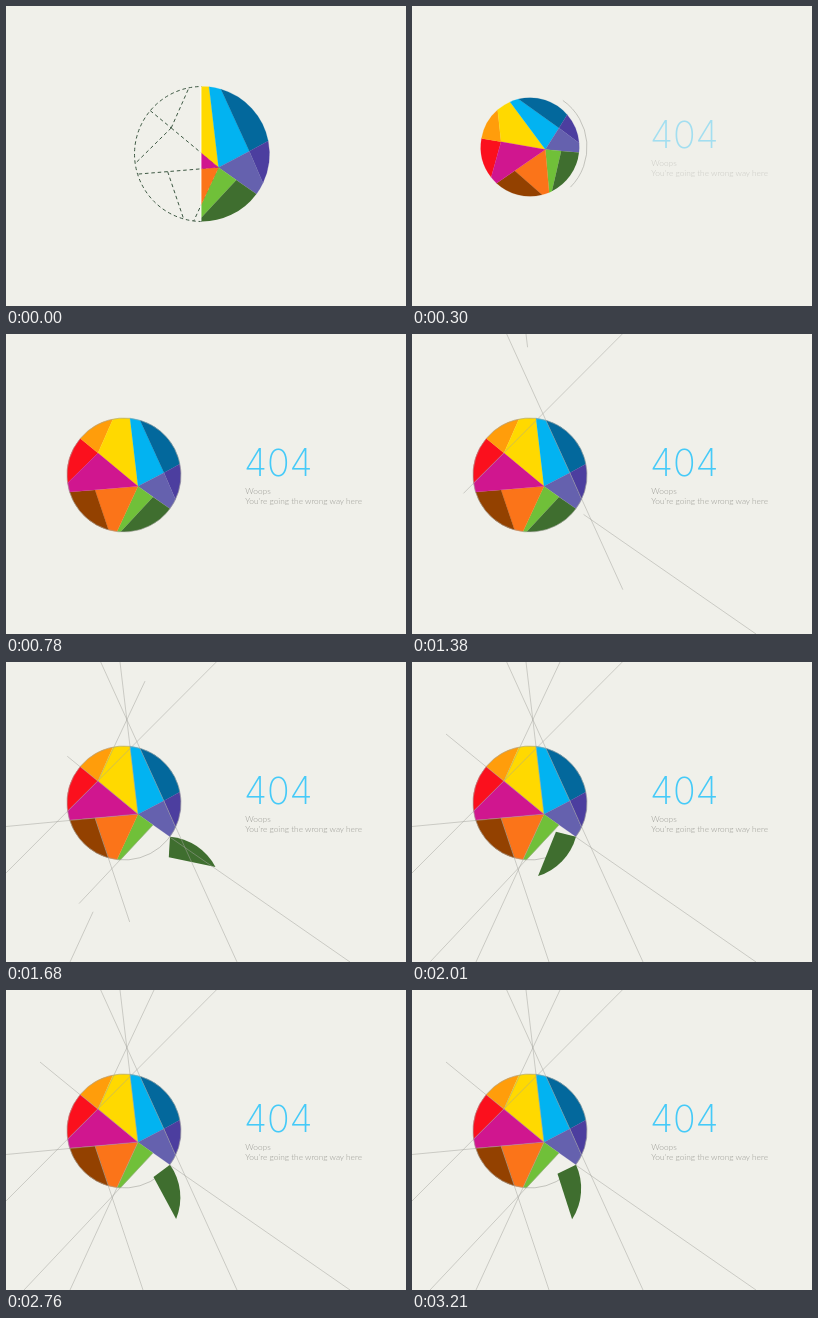
An HTML page that plays this animation: 400 by 300 pixels, repeating every 3.24 s.

```html
<!DOCTYPE html>
<html lang="en">
<head>
<meta charset="utf-8">
<title>404</title>
<style>
  html, body { margin: 0; width: 100%; height: 100%; overflow: hidden; background: #f0f0ea; }
  svg { display: block; width: 100%; height: 100%; }
  .code { font: 200 37.5px Inter, sans-serif; fill: #45caf8; }
  .note { font: 300 8.3px Lato, sans-serif; fill: #999993; }
</style>
</head>
<body>
<svg viewBox="0 0 400 300">
  <defs><clipPath id="wipe"><rect id="wipeRect" y="-60" width="140" height="120"/></clipPath></defs>
  <g id="ball">
    <g id="sketch">
      <path id="seams" fill="none" stroke="#33503a" stroke-width=".8" stroke-dasharray="3 2.4"/>
      <path id="wipeEdge" stroke="#fff" stroke-width="1.6"/>
    </g>
    <g clip-path="url(#wipe)"><g id="wedges"></g></g>
  </g>
  <path id="ring" fill="none" stroke="#a3a39c" stroke-width=".6"/>
  <g id="leafHolder" transform="translate(118 141)"></g>
  <g id="guides" stroke="#a3a39c" stroke-width=".5"></g>
  <g id="copy">
    <text class="code" x="238" y="141.8">404</text>
    <text class="note" x="239.3" y="160">Woops</text>
    <text class="note" x="239.3" y="170">You’re going the wrong way here</text>
  </g>
</svg>
<script>
const LOOP = 3240, R = 57;
const byId = id => document.getElementById(id);
const clamp = v => Math.max(0, Math.min(1, v));
const progress = (t, start, length) => clamp((t - start) / length);
const mix = (a, b, p) => a + (b - a) * p;
const easeOut = p => 1 - (1 - p) ** 3;
const easeSine = p => (1 - Math.cos(Math.PI * p)) / 2;

function add(parent, tag, attrs) {
  const el = document.createElementNS('http://www.w3.org/2000/svg', tag);
  for (const key in attrs) el.setAttribute(key, attrs[key]);
  return parent.appendChild(el);
}

// Eased value through [time, value] pairs.
function track(keys, t) {
  if (t <= keys[0][0]) return keys[0][1];
  for (let i = 1; i < keys.length; i++) {
    const [t0, v0] = keys[i - 1], [t1, v1] = keys[i];
    if (t < t1) return mix(v0, v1, easeSine((t - t0) / (t1 - t0)));
  }
  return keys[keys.length - 1][1];
}

// Ball geometry: inner joints, then rim points clockwise from the upper left.
const P = {
  A: [-26, -22], H: [14, 11.3], K: [40, -2.3], M: [29, 22], N: [-29, 14.9],
  a: [-43.7, -36.6], b: [-11, -56], c: [6, -56.7], d: [16, -54.7], e: [55.9, -11],
  f: [51.5, 24.4], g: [46, 33.7], m: [-3.5, 56.9], h: [-7, 56.6], i: [-15.5, 54.9],
  j: [-54.4, 17], k: [-56.4, 8]
};
const isRim = name => name === name.toLowerCase();
const outline = names => [...names].map((name, i) => {
  const arc = i && isRim(name) && isRim(names[i - 1]);
  return (i ? (arc ? `A${R} ${R} 0 0 1 ` : 'L') : 'M') + P[name];
}).join('') + 'Z';

const wedges = [
  ['Aka', '#fb101d'], ['Aab', '#ff9d0b'], ['HAbc', '#ffd900'], ['HcdK', '#02b3f1'],
  ['Kde', '#03689c'], ['Kef', '#4c3e9f'], ['HKfg', '#6561ae'], ['HMmh', '#70c039'],
  ['HhiN', '#fb7419'], ['Nij', '#934100'], ['AHjk', '#d0168f']
];
for (const [names, fill] of wedges) {
  add(byId('wedges'), 'path', { d: outline(names), fill, stroke: fill, 'stroke-width': .2 });
}
const leafAttrs = { d: outline('Mgm'), fill: '#3f6e2f' };
const attachedLeaf = add(byId('wedges'), 'path', leafAttrs);
const hangingLeaf = add(byId('leafHolder'), 'path', leafAttrs);

const seams = ['aA', 'Ak', 'Ab', 'AH', 'Hj', 'Ni', 'Hh'];
byId('seams').setAttribute('d',
  `M0 ${R}A${R} ${R} 0 0 1 0 ${-R}` + seams.map(([s, e]) => `M${P[s]}L${P[e]}`).join(''));

// Construction lines: x1, y1, x2, y2, start, duration.
const guides = [
  [344, 300, 163, 174.5, 1030, 550],
  [94.7, 0, 231, 300, 1070, 660],
  [210.3, 0, 0, 211, 1175, 550],
  [114, 0, 132, 152, 1372, 300],
  [0, 164.5, 132, 152, 1395, 360],
  [92, 119, 148, 0, 1430, 550],
  [89, 156, 137, 300, 1490, 550],
  [132, 152, 34, 72, 1490, 550],
  [147, 163, 18, 300, 1545, 550],
  [64, 300, 132, 152, 1610, 550]
].map(([x1, y1, x2, y2, start, length]) => ({
  x1, y1, x2, y2, start, length, el: add(byId('guides'), 'line', { x1, y1 })
}));

const scaleKeys = [[30, 1.184], [270, .86], [540, 1]];
const turnKeys = [[30, 0], [290, -30], [570, 0]];
const swingKeys = [
  [1410, 0], [1710, -124], [1990, -20], [2280, -92], [2520, -48], [2790, -72], [3060, -58], [3240, -61]
];

function drawRing(t) {
  const half = mix(0, 180, easeSine(progress(t, 160, 400)));
  const point = deg => {
    const a = deg * Math.PI / 180;
    return [118 + R * Math.cos(a), 141 + R * Math.sin(a)];
  };
  const arc = deg => `A${R} ${R} 0 0 ${deg > 0 ? 1 : 0} ${point(-5 + deg)}`;
  byId('ring').setAttribute('d', half ? `M${point(-5)}${arc(half)}M${point(-5)}${arc(-half)}` : '');
}

function render(t) {
  const move = easeSine(progress(t, 30, 250));
  const x = mix(196, 118, move), y = mix(148, 141, move);
  byId('ball').setAttribute('transform',
    `translate(${x} ${y}) rotate(${track(turnKeys, t)}) scale(${track(scaleKeys, t)})`);

  const wipe = progress(t, 0, 120), edge = -60 * wipe;
  const edgeHalf = Math.sqrt(Math.max(0, R * R - edge * edge));
  byId('wipeRect').setAttribute('x', edge);
  byId('wipeEdge').setAttribute('d', `M${edge} ${-edgeHalf}V${edgeHalf}`);
  byId('sketch').setAttribute('visibility', wipe < 1 ? 'visible' : 'hidden');

  drawRing(t);
  byId('copy').setAttribute('opacity', progress(t, 180, 270));

  const loose = t > 1410;
  attachedLeaf.setAttribute('visibility', loose ? 'hidden' : 'visible');
  hangingLeaf.setAttribute('visibility', loose ? 'visible' : 'hidden');
  hangingLeaf.setAttribute('transform', `rotate(${track(swingKeys, t)} ${P.g})`);

  for (const g of guides) {
    const p = easeOut(progress(t, g.start, g.length));
    g.el.setAttribute('x2', mix(g.x1, g.x2, p));
    g.el.setAttribute('y2', mix(g.y1, g.y2, p));
  }
}

const begin = performance.now();
function tick() {
  render((performance.now() - begin) % LOOP);
  requestAnimationFrame(tick);
}
tick();
</script>
</body>
</html>
```
